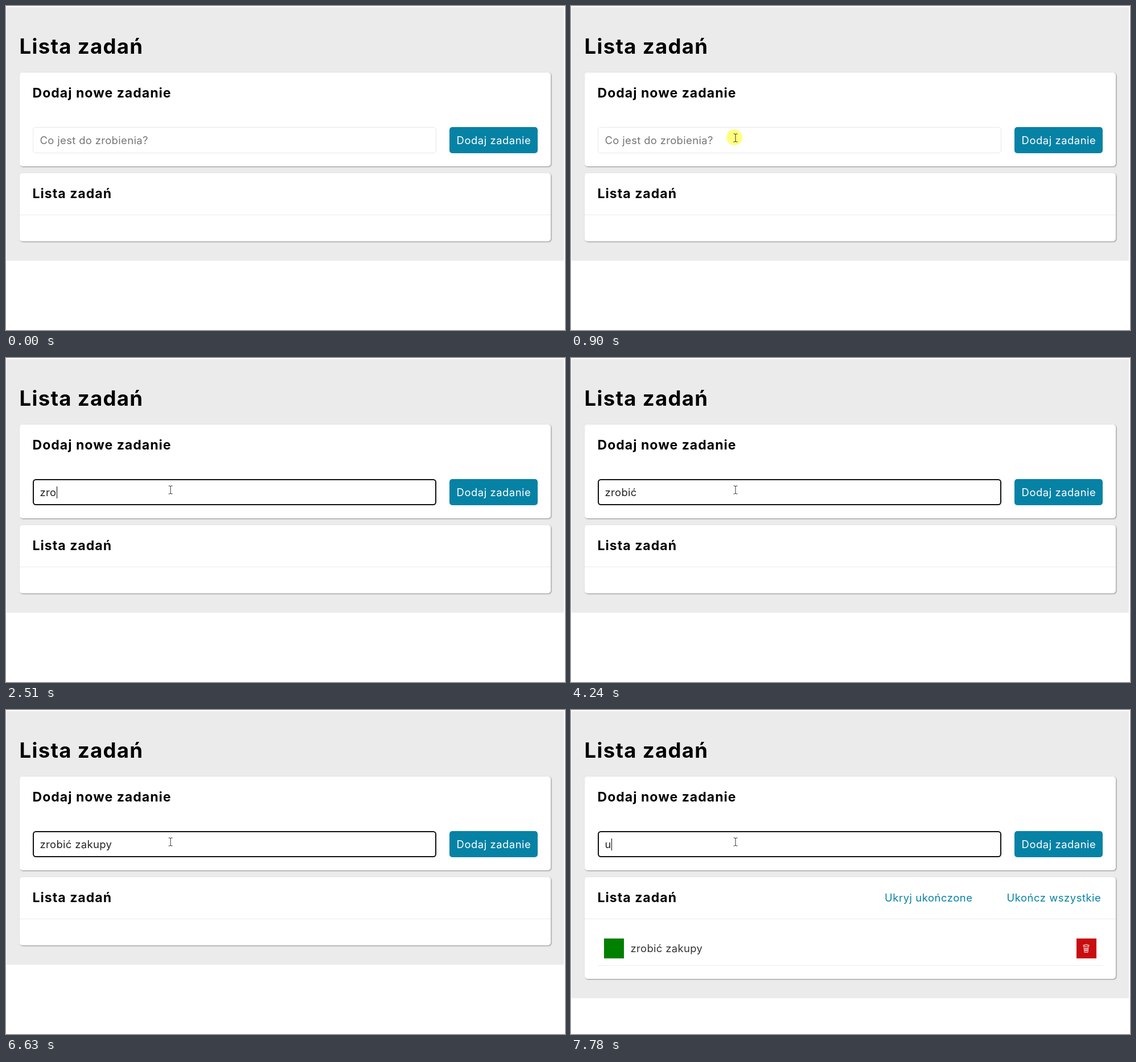
Write an HTML page that moves like this. It is 982 by 570 pixels and loops after 8000 ms.

```html
<!DOCTYPE html>
<html lang="pl">
<head>
<meta charset="utf-8">
<title>Lista zadań</title>
<style>
  html, body { margin: 0; width: 100%; height: 100%; overflow: hidden; background: #fff; }
  svg { display: block; width: 982px; height: 570px; }
  text { font: 400 18.4px Inter, "Open Sans", sans-serif; letter-spacing: .02em; white-space: pre; }
  .title { font-size: 36.5px; font-weight: 700; letter-spacing: .036em; }
  .heading { font-size: 23px; font-weight: 700; letter-spacing: .045em; }
  .action { letter-spacing: .03em; }
  .card { fill: #fff; filter: drop-shadow(1px 1px 1px #0006); }
  .line { fill: #ededed; }
  .link { fill: #0682a5; }
</style>
</head>
<body>
<svg viewBox="0 0 982 570">
  <rect id="page" x="1" y="2" width="979" height="446" fill="#ebebeb"/>
  <text class="title" x="23.5" y="84">Lista zadań</text>

  <rect class="card" x="24" y="117" width="933" height="165" rx="5"/>
  <text class="heading" x="46.5" y="161">Dodaj nowe zadanie</text>
  <rect id="field" fill="#fff"/>
  <text id="entry" x="59.5" y="243"></text>
  <rect id="caret" y="226" width="1" height="21"/>
  <rect x="779" y="213" width="155" height="46" rx="5" fill="#0682a5"/>
  <text class="action" x="857" y="243" fill="#fff" text-anchor="middle">Dodaj zadanie</text>

  <rect id="list" class="card" x="24" y="294" width="933" height="120" rx="5"/>
  <text class="heading" x="46.5" y="338">Lista zadań</text>
  <rect class="line" x="24" y="367" width="933" height="1"/>

  <g id="task">
    <text class="action link" x="551" y="337">Ukryj ukończone</text>
    <text class="action link" x="765.5" y="337">Ukończ wszystkie</text>
    <rect x="58" y="402" width="35" height="35" fill="#008000"/>
    <text x="104.5" y="426" fill="#333">zrobić zakupy</text>
    <rect x="888" y="402" width="35" height="35" fill="#c90c0f"/>
    <path d="M900 415.5h10v-2h-3v-1h-4v1h-3zM901 416l1 10.500h6l1-10.500M903.500 417l.5 8M906.500 417l-.5 8M902 420h6M902 423h6"
      fill="none" stroke="#f3dede"/>
    <rect class="line" x="47" y="449" width="887" height="1"/>
  </g>

  <g id="pointer">
    <circle id="halo" r="14" fill="#ffff80"/>
    <path id="beam" d="M-1.500-6h2.500l1 1 1-1h2.500M2-5V7M-1.500 8h2.500l1-1 1 1h2.500" fill="none" stroke="#333"/>
    <path id="arrow" d="M0 0V17l4-4 2.500 6 2.500-1-2.500-6h5.500z" fill="#fff" stroke="#000"/>
  </g>
</svg>
<script>
  const LOOP = 8000, STEP = 69, FOCUS = 970, HALO_END = 1030, SUBMIT = 6830, BLINK = 530;
  const PLACEHOLDER = 'Co jest do zrobienia?';
  const FIRST = 'zrobić zakupy';
  const KEY_TIMES = [1900, 2180, 2510, 2710, 2910, 3440, 3710, 4300, 4580, 4910, 5180, 5640, 6100];
  const NEXT_KEY = 7780;

  const el = id => document.getElementById(id);
  const set = (id, attrs) => {
    for (const name in attrs) el(id).setAttribute(name, attrs[name]);
  };
  const show = (id, on) => set(id, { visibility: on ? 'visible' : 'hidden' });
  const ease = p => p * p * (3 - 2 * p);
  const mix = (a, b, p) => a + (b - a) * p;

  // Sweeps in from the lower right, overshoots the field, then settles.
  function pointerAt(t) {
    const step = Math.min(Math.floor(t / STEP), 13);
    const [from, to, p] = step <= 9
      ? [[794, 531], [239, 221], (step - 1) / 8]
      : [[239, 221], [287, 231], (step - 9) / 4];
    return from.map((v, i) => mix(v, to[i], ease(Math.max(p, 0))));
  }

  function drawPointer(t) {
    const [x, y] = pointerAt(t);
    const visible = t >= STEP;
    const inField = x > 47 && x < 756 && y > 213 && y < 259;
    set('pointer', { transform: `translate(${x} ${y})` });
    show('halo', visible && t < HALO_END);
    show('beam', visible && inField);
    show('arrow', visible && !inField);
  }

  function drawField(t) {
    const focused = t >= FOCUS;
    set('field', focused
      ? { x: 48, y: 214, width: 707, height: 44, rx: 4.5, stroke: '#101010', 'stroke-width': 2 }
      : { x: 47.5, y: 213.5, width: 708, height: 45, rx: 4.5, stroke: '#e8e8e8', 'stroke-width': 1 });

    const typed = t >= NEXT_KEY ? 'u'
      : t >= SUBMIT ? ''
      : FIRST.slice(0, KEY_TIMES.filter(k => k <= t).length);
    el('entry').textContent = typed || PLACEHOLDER;
    set('entry', { fill: typed ? '#222' : '#757575' });

    // Every key press restarts the blink.
    const lastKey = [FOCUS, ...KEY_TIMES, NEXT_KEY].filter(k => k <= t).pop();
    const width = typed ? el('entry').getComputedTextLength() : 0;
    set('caret', { x: Math.round(60 + width) });
    show('caret', focused && Math.floor((t - lastKey) / BLINK) % 2 === 0);
  }

  function drawList(t) {
    const added = t >= SUBMIT;
    set('page', { height: added ? 505 : 446 });
    set('list', { height: added ? 179 : 120 });
    show('task', added);
  }

  const start = performance.now();
  function frame() {
    const t = (performance.now() - start) % LOOP;
    drawPointer(t);
    drawField(t);
    drawList(t);
    requestAnimationFrame(frame);
  }
  frame();
</script>
</body>
</html>
```
